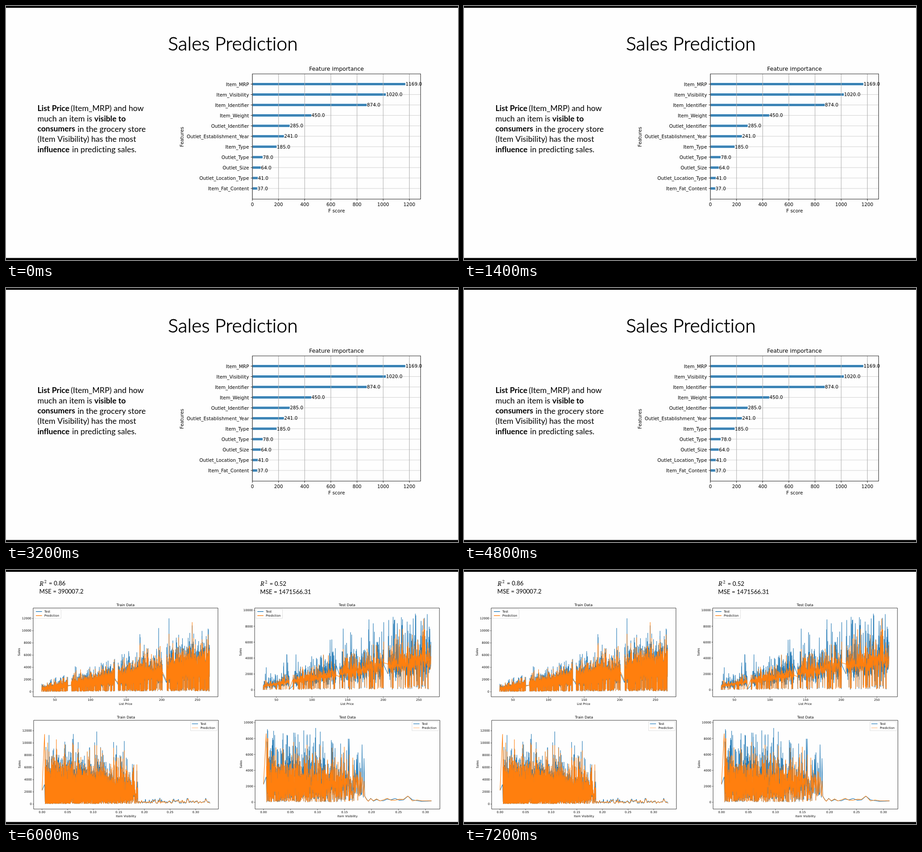
An HTML page with a canvas for the animation above (8 s loop, 998 by 561 pixels).

```html
<!DOCTYPE html>
<html lang="en">
<head>
<meta charset="utf-8">
<title>Sales Prediction</title>
<style>
  html, body { margin: 0; width: 100%; height: 100%; overflow: hidden; background: #fefefe; }
  canvas { position: absolute; left: 0; top: 0; }
</style>
</head>
<body>
<canvas id="importance" width="998" height="561"></canvas>
<canvas id="results" width="998" height="561"></canvas>
<script>
const BLUE = '#1f77b4', ORANGE = '#ff7f0e';
const PLOT = '"DejaVu Sans", sans-serif', BODY = 'Lato, sans-serif', MATH = '"Noto Serif", serif';
const LOOP = 8000, CUT = 6000;
let ctx;

function openSlide(id) {
  const canvas = document.getElementById(id);
  ctx = canvas.getContext('2d');
  ctx.letterSpacing = '0.01px'; // turns ligatures off
  ctx.fillStyle = '#fefefe';
  ctx.fillRect(0, 0, 998, 561);
  ctx.fillStyle = '#000';
  ctx.fillRect(0, 0, 998, 4);
  ctx.fillRect(0, 556.5, 998, 5);
  return canvas;
}

// y is the middle of the capital letters
function text(str, x, y, size, align = 'left', family = PLOT, style = '') {
  ctx.font = `${style} ${size}px ${family}`;
  ctx.textAlign = align;
  ctx.fillStyle = '#000';
  ctx.fillText(str, x, y + size * 0.36);
}

function sideways(str, x, y, size) {
  ctx.save();
  ctx.translate(x, y);
  ctx.rotate(-Math.PI / 2);
  text(str, 0, 0, size, 'center');
  ctx.restore();
}

function line(points, color, width) {
  ctx.beginPath();
  for (const [x, y] of points) ctx.lineTo(x, y);
  ctx.strokeStyle = color;
  ctx.lineWidth = width;
  ctx.stroke();
}

function frame(left, top, width, height, color, weight) {
  ctx.strokeStyle = color;
  ctx.lineWidth = weight;
  ctx.strokeRect(left, top, width, height);
}

// Each line is a list of [x, run]; runs starting with * are bold
function drawParagraph() {
  const lines = [
    [[69.5, '*List Price'], [143, '(Item_MRP) and how']],
    [[69.5, 'much an item is'], [195, '*visible to']],
    [[69.5, '*consumers'], [158, 'in the grocery store']],
    [[69.5, '(Item Visibility) has the most']],
    [[69.5, '*influence'], [146, 'in predicting sales.']]
  ];
  lines.forEach((runs, i) => {
    for (const [x, run] of runs) {
      const bold = run[0] === '*';
      text(run.replace('*', ''), x, 225.8 + i * 22.7, bold ? 17.3 : 17.6, 'left', BODY, bold ? 'bold' : '');
    }
  });
}

function drawImportance() {
  const features = {
    Item_MRP: 1169, Item_Visibility: 1020, Item_Identifier: 874, Item_Weight: 450,
    Outlet_Identifier: 285, Outlet_Establishment_Year: 241, Item_Type: 185,
    Outlet_Type: 78, Outlet_Size: 64, Outlet_Location_Type: 41, Item_Fat_Content: 37
  };
  const left = 544, right = 915.5, top = 150, bottom = 426.5, size = 10.3;
  const toX = score => left + score * 0.2888;
  const rows = Object.entries(features).map(([name, score], i) => ({ name, score, y: 172.5 + i * 23.05 }));

  text('Sales Prediction', 501, 83, 42.2, 'center', BODY, '300');
  ctx.strokeStyle = '#000';
  ctx.lineWidth = 0.8;
  ctx.strokeText('Sales Prediction', 501, 83 + 42.2 * 0.36);
  drawParagraph();

  ctx.fillStyle = BLUE;
  for (const { score, y } of rows) ctx.fillRect(left, y - 2.5, toX(score) - left, 5);
  for (let score = 0; score <= 1200; score += 200) {
    const x = toX(score);
    line([[x, top], [x, bottom]], '#b0b0b0', 1.1);
    line([[x, bottom], [x, bottom + 3.6]], '#000', 0.9);
    text(score, x, 438, size, 'center');
  }
  for (const { name, score, y } of rows) {
    line([[left, y], [right, y]], '#b0b0b0', 0.6);
    line([[left - 3.6, y], [left, y]], '#000', 0.9);
    text(name, left - 7.5, y + 0.5, size, 'right');
    text(score.toFixed(1), toX(score) + 0.6, y, size);
  }
  frame(left, top, right - left, bottom - top, '#222', 1);
  text('Feature importance', 729.7, 139, 12.3, 'center');
  text('F score', 730, 452, size, 'center');
  sideways('Features', 388, 289, size);
}

function seeded(seed) {
  return () => (seed = (seed * 16807) % 2147483647) / 2147483647;
}

// Prices fall in four bands with gaps between them
function priceAt(u) {
  const bands = [[31.5, 68], [73, 134], [138.5, 201], [206.5, 267]];
  let rest = u * 220.5;
  for (const [from, to] of bands) {
    if (rest <= to - from) return from + rest;
    rest -= to - from;
  }
  return 267;
}

// Rows of [x, actual sales, predicted sales], ordered by x
function makeRows({ seed, count, tail, spread, fit, error, maxSales, maxVisibility }, byPrice) {
  const rnd = seeded(seed);
  const gauss = () => (rnd() + rnd() + rnd() + rnd() - 2) * 1.73;
  const limit = v => v > maxSales ? maxSales * (0.6 + 0.4 * rnd()) : v;
  const rows = byPrice ? [] : [[0, 2250, 2250], [0.005, 3200, maxSales * 0.88]];
  for (let i = 0; i < count; i++) {
    const u = i / count, price = priceAt(byPrice ? u : rnd());
    const x = byPrice ? price : 0.006 + 0.184 * (1 - (1 - u) ** 0.58);
    const kind = rnd(), noise = gauss() * spread;
    const factor = kind < 0.11 ? 0.03 + 0.12 * rnd() : kind > 0.9 ? 1.5 : 1;
    const mean = 15 * price * factor;
    rows.push([x, limit(mean * Math.exp(noise)), limit(mean * Math.exp(noise * fit + error * gauss()))]);
  }
  for (let i = 0; !byPrice && i < tail; i++) {
    const base = 150 + 550 * rnd() ** 1.5;
    const x = 0.191 + (maxVisibility - 0.191) * (i / (tail - 1)) ** 1.3;
    rows.push([x, base * (0.5 + rnd()), base * (0.7 + 0.6 * rnd())]);
  }
  return rows;
}

function drawResult(data, byPrice) {
  const width = 408, height = 196, size = 6.55;
  const left = data.left + (byPrice ? 0 : 1), top = byPrice ? 84 : 332, bottom = top + height;
  const [min, max] = byPrice ? [31.3, 267] : [0, data.maxVisibility];
  const toX = v => left + width / 22 + (v - min) / (max - min) * width / 1.1;
  const toY = v => top + data.zero - v * data.unit;
  const rows = makeRows(data, byPrice);
  ctx.lineJoin = 'bevel';
  line(rows.map(([x, actual]) => [toX(x), toY(actual)]), BLUE, 1.1);
  line(rows.map(([x, , predicted]) => [toX(x), toY(predicted)]), ORANGE, 1.1);
  frame(left, top, width, height, '#222', 0.9);

  const step = byPrice ? 50 : 0.05;
  for (let v = byPrice ? step : 0; v < max; v += step) {
    line([[toX(v), bottom], [toX(v), bottom + 2]], '#000', 0.7);
    text(byPrice ? v : v.toFixed(2), toX(v), bottom + 6.6, size, 'center');
  }
  for (let v = 0; toY(v) > top; v += 2000) {
    line([[left - 2, toY(v)], [left, toY(v)]], '#000', 0.7);
    text(v, left - 4, toY(v), size, 'right');
  }
  const middle = left + width / 2;
  text(data.title, middle, top - 6.6, 7.8, 'center');
  text(byPrice ? 'List Price' : 'Item Visibility', middle, bottom + 15.4, size, 'center');
  sideways('Sales', left - 31.5, top + 97, size);

  const legendX = byPrice ? left + 3 : left + width - 61.5, legendY = top + 2.8;
  ctx.fillStyle = 'rgba(255,255,255,.8)';
  ctx.fillRect(legendX, legendY, 58.5, 20);
  frame(legendX, legendY, 58.5, 20, '#ccc', 0.6);
  ['Test', 'Prediction'].forEach((name, i) => {
    const y = legendY + 4.9 + i * 9;
    line([[legendX + 3, y], [legendX + 16.5, y]], i ? ORANGE : BLUE, byPrice ? 1.4 : i ? 0.6 : 1.2);
    text(name, legendX + 21.7, y, size);
  });
}

function drawScores(x, y, r2, mse) {
  text('R', x, y, 13.5, 'left', MATH, 'italic');
  text('2', x + 10.5, y - 3.5, 9, 'left', MATH);
  text('= ' + r2, x + 20.5, y, 13.1, 'left', BODY);
  text('MSE = ' + mse, x - 0.5, y + 17.6, 13.1, 'left', BODY);
}

function drawResults() {
  drawScores(74, 29.7, '0.86', '390007.2');
  drawScores(561.5, 30.4, '0.52', '1471566.31');
  const train = {
    title: 'Train Data', left: 60, zero: 185, unit: 0.0135, maxSales: 13000, maxVisibility: 0.328,
    seed: 11, count: 5200, tail: 85, spread: 0.36, fit: 0.75, error: 0.12
  };
  const test = {
    title: 'Test Data', left: 549, zero: 181, unit: 0.0176, maxSales: 9800, maxVisibility: 0.311,
    seed: 23, count: 1500, tail: 18, spread: 0.45, fit: 0.1, error: 0.2
  };
  for (const data of [train, test]) {
    drawResult(data, true);
    drawResult(data, false);
  }
}

openSlide('importance');
drawImportance();
const results = openSlide('results');
drawResults();

function tick() {
  results.style.visibility = performance.now() % LOOP < CUT ? 'hidden' : 'visible';
  requestAnimationFrame(tick);
}
tick();
</script>
</body>
</html>
```
